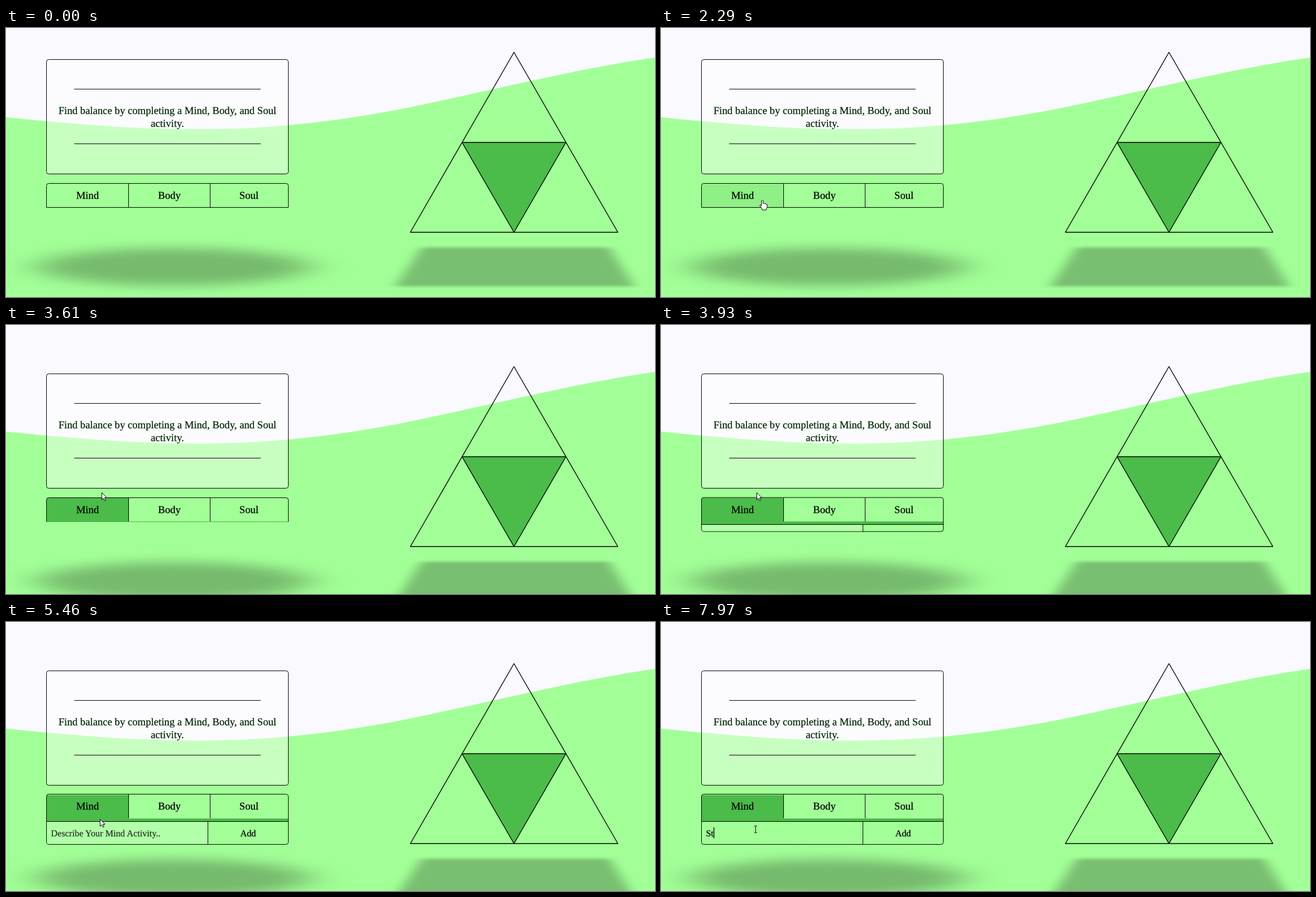
An HTML page for the animation above (8 s loop, 1162x482 px).

```html
<!DOCTYPE html>
<html lang="en">
<head>
<meta charset="utf-8">
<title>Balance</title>
<style>
  html, body { margin: 0; width: 100%; height: 100%; overflow: hidden; background: #f9f9ff; }
  svg { display: block; }
  text {
    font: 18.7px "Liberation Serif", serif;
    text-rendering: geometricPrecision;
    stroke: currentColor; stroke-width: .25px;
  }
  .mid { text-anchor: middle; }
  .quote { fill: #022602; color: #022602; }
  .small { font-size: 16.3px; }
  .line { fill: none; stroke: #000; }
  .pointer { fill: #fff; stroke: #000; stroke-linejoin: round; }
</style>
</head>
<body>
<svg width="1162" height="482" viewBox="0 0 1162 482">
  <defs>
    <filter id="soft" x="-50%" y="-100%" width="200%" height="300%" color-interpolation-filters="sRGB">
      <feGaussianBlur stdDeviation="36 10"/>
    </filter>
    <filter id="crisp" x="-20%" y="-20%" width="140%" height="140%" color-interpolation-filters="sRGB">
      <feGaussianBlur stdDeviation="11 2.5"/>
    </filter>
    <clipPath id="fold"><rect id="foldRect" x="72" y="321" width="434" height="0"/></clipPath>
  </defs>

  <g id="scene">
    <path fill="#a2ff97" d="M0,160C129,173 258,184 387,181C517,178 645,160 775,131C904,103 1033,71.5 1162,53V482H0Z"/>
    <ellipse cx="300" cy="428" rx="246" ry="34" fill="#76ba6d" filter="url(#soft)"/>
    <path d="M744,393H1080L1125,463H697Z" fill="#79bf71" filter="url(#crisp)"/>

    <rect x="72.5" y="56.5" width="433" height="205" rx="4" fill="#fff" fill-opacity=".4" stroke="#000"/>
    <path class="line" d="M122,109.5H456M122,207.5H456"/>
    <text class="mid quote" x="289" y="154">Find balance by completing a Mind, Body, and Soul</text>
    <text class="mid quote" x="289" y="177">activity.</text>

    <g stroke="#000" stroke-width="1.4" stroke-linejoin="round">
      <path fill="none" d="M909.5,43.5L1095.5,366H724Z"/>
      <path fill="#4bbb49" d="M816.5,205H1002.5L909.5,366Z"/>
    </g>

    <rect id="mindFill" x="73" y="279" width="146" height="42" fill="#4bbb49"/>
    <path id="box" class="line"/>
    <g id="tabs">
      <path class="line" d="M219.5,279V321.5M365.5,279V321.5"/>
      <text class="mid" x="146" y="306">Mind</text>
      <text class="mid" x="292.5" y="306">Body</text>
      <text class="mid" x="435" y="306">Soul</text>
    </g>
    <g clip-path="url(#fold)">
      <rect x="73" y="321" width="432" height="5" fill="#4bbb49"/>
      <rect id="field" x="73" y="327" width="288" height="40" fill="#fff" fill-opacity=".17"/>
      <path class="line" d="M73,326.5H505M361.5,327V367"/>
      <text id="entry" class="small" x="80.5" y="353"></text>
      <text class="mid small" x="433.5" y="353">Add</text>
      <path id="caret" class="line" stroke-width="1.4" d="M0,337V356.500"/>
    </g>
  </g>

  <circle id="click" r="11.5" fill="#ff0" fill-opacity=".47"/>
  <g id="cursor">
    <path id="arrow" class="pointer" d="M.5,.5V13L3.400,10.300 5.500,14.800 7.500,13.900 5.500,9.500H9.300Z"/>
    <path id="hand" class="pointer" d="M-1,11V2Q-1,.5 .5,.5T2,2V6.500Q3.500,5.500 4.500,7Q6,6 7,7.500Q9,7 9,9V13Q8.500,15 7.500,16V18H0V16L-4,10.500Q-4,8.500 -2.500,9Z"/>
    <path id="beam" class="line" d="M-1,-5.500H1L1.500,-5 2,-5.500H4M1.500,-5V6M-1,6.500H1L1.500,6 2,6.500H4"/>
  </g>
</svg>

<script>
const LOOP = 8000, DROP = 31, TICK = 77.1;
const $ = id => document.getElementById(id);
const set = (id, name, value) => $(id).setAttribute(name, value);
const show = (id, on) => set(id, 'visibility', on ? 'visible' : 'hidden');
const clamp = x => Math.max(0, Math.min(1, x));
const within = (t, a, b) => t >= a && t < b;

// pointer path: time, x, y
const path = [
  [440, 1065, 455], [690, 880, 389], [900, 640, 360], [1133, 506, 352],
  [1442, 506, 352], [1780, 350, 338], [2050, 230, 326], [2150, 200, 314],
  [2290, 181, 308], [3060, 171, 300], [4930, 171, 300], [5450, 168, 353],
  [5770, 168, 371], [LOOP, 168, 371]
];

function pointerAt(t) {
  const i = Math.max(1, path.findIndex(k => k[0] >= t));
  const [t0, x0, y0] = path[i - 1], [t1, x1, y1] = path[i];
  const p = clamp((t - t0) / (t1 - t0));
  return [Math.round(x0 + (x1 - x0) * p), Math.round(y0 + (y1 - y0) * p)];
}

function draw(t) {
  // the screen refreshes in even ticks
  const q = 2290 + Math.floor((t - 2290) / TICK) * TICK;
  const active = t >= 3610, focus = t >= 6080;

  set('scene', 'transform', `translate(0 ${active ? DROP : 0})`);
  set('mindFill', 'opacity', clamp((q - 2130) / 700));

  const p = clamp((q - 3690) / 520), open = p * p * (3 - 2 * p);
  const top = 278.5 - open, bottom = 321.5 + 46 * open, r = open ? 4 : 0;
  set('tabs', 'transform', `translate(0 ${-open})`);
  set('box', 'd', `M${72.5 + r},${bottom}q${-r},0 ${-r},${-r}V${top + 4}q0,-4 4,-4H501.5q4,0 4,4V${bottom - r}q0,${r} ${-r},${r}Z`);
  set('foldRect', 'height', active ? 1 + 45 * open : 0);

  const typed = t >= 7970 ? 'St' : t >= 7610 ? 'S' : '';
  $('entry').textContent = typed || 'Describe Your Mind Activity..';
  set('entry', 'opacity', typed ? 1 : focus ? .5 : .8);
  show('field', !focus);
  show('caret', focus && !within(t, 6650, 7110));
  set('caret', 'transform', `translate(${[80.7, 89.7, 94.7][typed.length]} 0)`);

  const [x, y] = pointerAt(q);
  const beam = y >= 357 && t > 5460, hand = within(t, 2130, 3530);
  set('cursor', 'transform', `translate(${x} ${y})`);
  show('beam', beam);
  show('hand', hand);
  show('arrow', t >= 440 && !beam && !hand);

  set('click', 'transform', `translate(${x - .5} ${y})`);
  show('click', within(t, 3360, 3530) || within(t, 6080, 6250));
}

const start = performance.now();
function frame(now) {
  draw(Math.max(0, now - start) % LOOP);
  requestAnimationFrame(frame);
}
draw(0);
requestAnimationFrame(frame);
</script>
</body>
</html>
```
